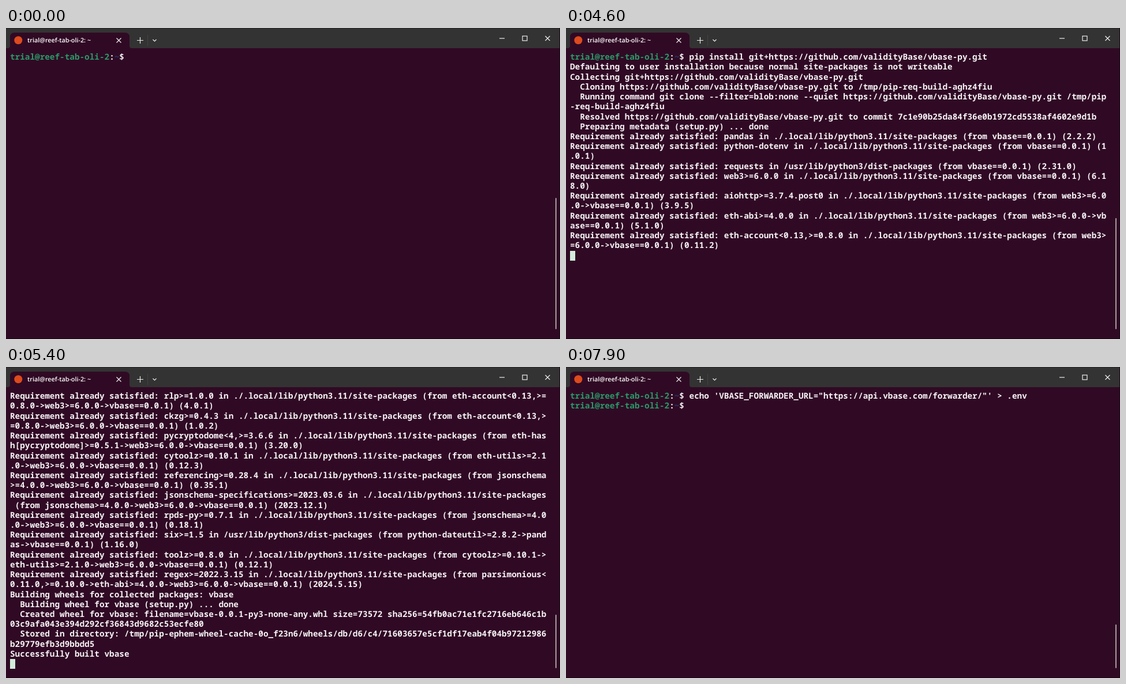
An HTML page for the animation above (8 s loop, 960 by 540 pixels).

```html
<!DOCTYPE html>
<html lang="en">
<head>
<meta charset="utf-8">
<title>Terminal</title>
<style>
  html, body { margin: 0; width: 100%; height: 100%; overflow: hidden; background: #300a24; }
  #stage { position: relative; width: 960px; height: 540px; overflow: hidden; background: #300a24; }
  #chrome { position: absolute; left: 0; top: 0; }
  #title {
    position: absolute; left: 37px; top: 12px; line-height: 20px; white-space: pre;
    font: 600 10.8px/20px "Open Sans", sans-serif; color: #fff; text-rendering: geometricPrecision;
  }
  #screen {
    position: absolute; left: 7px; top: 42.2px; margin: 0; color: #f6f2f5;
    font: 600 14.35px/17.22px "Noto Sans Mono", monospace;
    font-variant-ligatures: none; text-rendering: geometricPrecision; white-space: pre;
  }
  .user { color: #2a9a69; }
  .dir { color: #1d4580; }
  #cursor { position: absolute; width: 8.61px; height: 17.22px; background: #d3ecdc; }
  #thumb { position: absolute; left: 952px; width: 2px; bottom: 17px; border-radius: 1px; background: #a89ba4; }
</style>
</head>
<body>
<div id="stage">
  <svg id="chrome" width="960" height="540" fill="none">
    <rect width="960" height="35" fill="#333"/>
    <rect width="960" height="1" fill="#222"/>
    <path d="M3 35q4 0 4-4V16q0-8 8-8H206q8 0 8 8v15q0 4 4 4z" fill="#300a24"/>
    <circle cx="21.3" cy="21.3" r="7" fill="#dd4a1c"/>
    <path d="M245.5 12v19" stroke="#444"/>
    <g stroke="#eee" stroke-width="1.2">
      <path d="M191.5 17.5l8 8m0-8l-8 8"/>
      <path d="M227 21.5h11m-5.500-5.500v11"/>
      <path d="M254.500 20l3 3 3-3"/>
      <path d="M855 18h9"/>
      <rect x="895" y="14" width="8" height="8"/>
      <path d="M934.500 14l8 8m0-8l-8 8"/>
    </g>
    <path d="M959.500 0v540M0 539.500h960" stroke="#14060f"/>
  </svg>
  <div id="title"></div>
  <div id="cursor"></div>
  <pre id="screen"></pre>
  <div id="thumb"></div>
</div>
<script>
const LOOP = 8000, COLS = 108, ROWS = 28, CELL_W = 8.61, CELL_H = 17.22;
const USER = 'trial@reef-tab-oli-2';
const PROMPT = USER + ':~$ ';
const REPO = 'https://github.com/validityBase/vbase-py.git';
const BUILD = '/tmp/pip-req-build-aghz4fiu';
const LOCAL = './.local/lib/python3.11/site-packages';
const DIST = '/usr/lib/python3/dist-packages';
const VBASE = 'vbase==0.0.1';
const WEB3 = 'web3>=6.0.0->' + VBASE;
const ACCOUNT = 'eth-account<0.13,>=0.8.0->' + WEB3;
const SCHEMA = 'jsonschema>=4.0.0->' + WEB3;
const AIO = 'aiohttp>=3.7.4.post0->' + WEB3;

const req = (pkg, from, version, path = LOCAL) =>
  `Requirement already satisfied: ${pkg} in ${path} (from ${from}) (${version})\n`;

// Each step: time, text written to the terminal, optional top of the scroll thumb.
// "\f" clears the screen.
const steps = [
  [0, PROMPT, 295],
  [800, `pip install git+${REPO}`],
  [1600, '\n'],
  [2700, 'Defaulting to user installation because normal site-packages is not writeable\n'],
  [2800, `Collecting git+${REPO}\n  Cloning ${REPO} to ${BUILD}\n` +
    `  Running command git clone --filter=blob:none --quiet ${REPO} ${BUILD}\n`],
  [4400, `  Resolved ${REPO} to commit 7c1e90b25da84f36e0b1972cd5538af4602e9d1b\n` +
    '  Preparing metadata (setup.py) ... '],
  [4600, 'done\n' +
    req('pandas', VBASE, '2.2.2') +
    req('python-dotenv', VBASE, '1.0.1') +
    req('requests', VBASE, '2.31.0', DIST) +
    req('web3>=6.0.0', VBASE, '6.18.0') +
    req('aiohttp>=3.7.4.post0', WEB3, '3.9.5') +
    req('eth-abi>=4.0.0', WEB3, '5.1.0') +
    req('eth-account<0.13,>=0.8.0', WEB3, '0.11.2'), 330],
  [4700,
    req('eth-hash[pycryptodome]>=0.5.1', WEB3, '0.7.0') +
    req('eth-typing>=3.0.0', WEB3, '4.2.3') +
    req('eth-utils>=2.1.0', WEB3, '4.1.1') +
    req('hexbytes<0.4.0,>=0.1.0', WEB3, '0.3.1') +
    req('jsonschema>=4.0.0', WEB3, '4.22.0') +
    req('protobuf>=4.21.6', WEB3, '5.26.1') +
    req('websockets>=10.0.0', WEB3, '12.0') +
    req('numpy>=1.23.2', 'pandas->' + VBASE, '1.26.4') +
    req('python-dateutil>=2.8.2', 'pandas->' + VBASE, '2.8.2', DIST), 370],
  [4800,
    req('aiosignal>=1.1.2', AIO, '1.3.1') +
    req('attrs>=17.3.0', AIO, '23.2.0') +
    req('frozenlist>=1.1.1', AIO, '1.4.1') +
    req('multidict<7.0,>=4.5', AIO, '6.0.5') +
    req('yarl<2.0,>=1.0', AIO, '1.9.4') +
    req('parsimonious<0.11.0,>=0.10.0', 'eth-abi>=4.0.0->' + WEB3, '0.10.0') +
    req('eth-rlp>=0.3.0', ACCOUNT, '1.0.1') +
    req('eth-keyfile>=0.6.0', ACCOUNT, '0.8.1') +
    req('eth-keys>=0.4.0', ACCOUNT, '0.5.1') +
    req('bitarray>=2.4.0', ACCOUNT, '2.9.2'), 412],
  [4900,
    req('rlp>=1.0.0', ACCOUNT, '4.0.1') +
    req('ckzg>=0.4.3', ACCOUNT, '1.0.2') +
    req('pycryptodome<4,>=3.6.6', 'eth-hash[pycryptodome]>=0.5.1->' + WEB3, '3.20.0') +
    req('cytoolz>=0.10.1', 'eth-utils>=2.1.0->' + WEB3, '0.12.3') +
    req('referencing>=0.28.4', SCHEMA, '0.35.1') +
    req('jsonschema-specifications>=2023.03.6', SCHEMA, '2023.12.1') +
    req('rpds-py>=0.7.1', SCHEMA, '0.18.1') +
    req('six>=1.5', 'python-dateutil>=2.8.2->pandas->' + VBASE, '1.16.0', DIST)],
  [5000,
    req('toolz>=0.8.0', 'cytoolz>=0.10.1->eth-utils>=2.1.0->' + WEB3, '0.12.1') +
    req('regex>=2022.3.15', 'parsimonious<0.11.0,>=0.10.0->eth-abi>=4.0.0->' + WEB3, '2024.5.15') +
    'Building wheels for collected packages: vbase\n  Building wheel for vbase (setup.py) ... ', 430],
  [5400, 'done\n  Created wheel for vbase: filename=vbase-0.0.1-py3-none-any.whl size=73572 ' +
    'sha256=54fb0ac71e1fc2716eb646c1b03c9afa043e394d292cf36843d9682c53ecfe80\n' +
    '  Stored in directory: /tmp/pip-ephem-wheel-cache-0o_f23n6/wheels/db/d6/c4/' +
    '71603657e5cf1df17eab4f04b97212986b29779efb3d9bbdd5\nSuccessfully built vbase\n'],
  [5500, 'Installing collected packages: vbase\n'],
  [5600, 'Successfully installed vbase-0.0.1\n'],
  [5800, PROMPT],
  ...[...'clear'].map((key, i) => [6100 + i * 100, key]),
  [6700, '\f' + PROMPT, 447],
  [7100, `echo 'VBASE_FORWARDER_URL="https://api.vbase.com/forwarder/"' > .env`],
  [7400, '\n' + PROMPT],
];

const $ = id => document.getElementById(id);
const wrap = line => line.match(new RegExp(`.{1,${COLS}}`, 'g')) || [''];
const escapeHtml = s => s.replace(/&/g, '&amp;').replace(/</g, '&lt;');
const coloured = `<span class="user">${USER}</span>:<span class="dir">~</span>$ `;

$('title').textContent = USER + ': ~';

function draw(count) {
  const done = steps.slice(0, count);
  const text = done.map(step => step[1]).join('').split('\f').pop();
  const rows = text.split('\n').flatMap(wrap).slice(-ROWS);
  $('screen').innerHTML = rows.map(row => escapeHtml(row).replace(PROMPT, () => coloured)).join('\n');
  $('cursor').style.left = 7 + rows[rows.length - 1].length * CELL_W + 'px';
  $('cursor').style.top = 42.2 + (rows.length - 1) * CELL_H + 'px';
  $('thumb').style.top = done.filter(step => step[2]).pop()[2] + 'px';
}

let shown = 0;
function frame() {
  const t = performance.now() % LOOP;
  const count = steps.filter(step => step[0] <= t).length;
  if (count !== shown) draw(shown = count);
  $('cursor').style.visibility = t < 100 || t >= 7900 || (t >= 600 && t < 800) ? 'hidden' : 'visible';
  requestAnimationFrame(frame);
}
frame();
</script>
</body>
</html>
```
